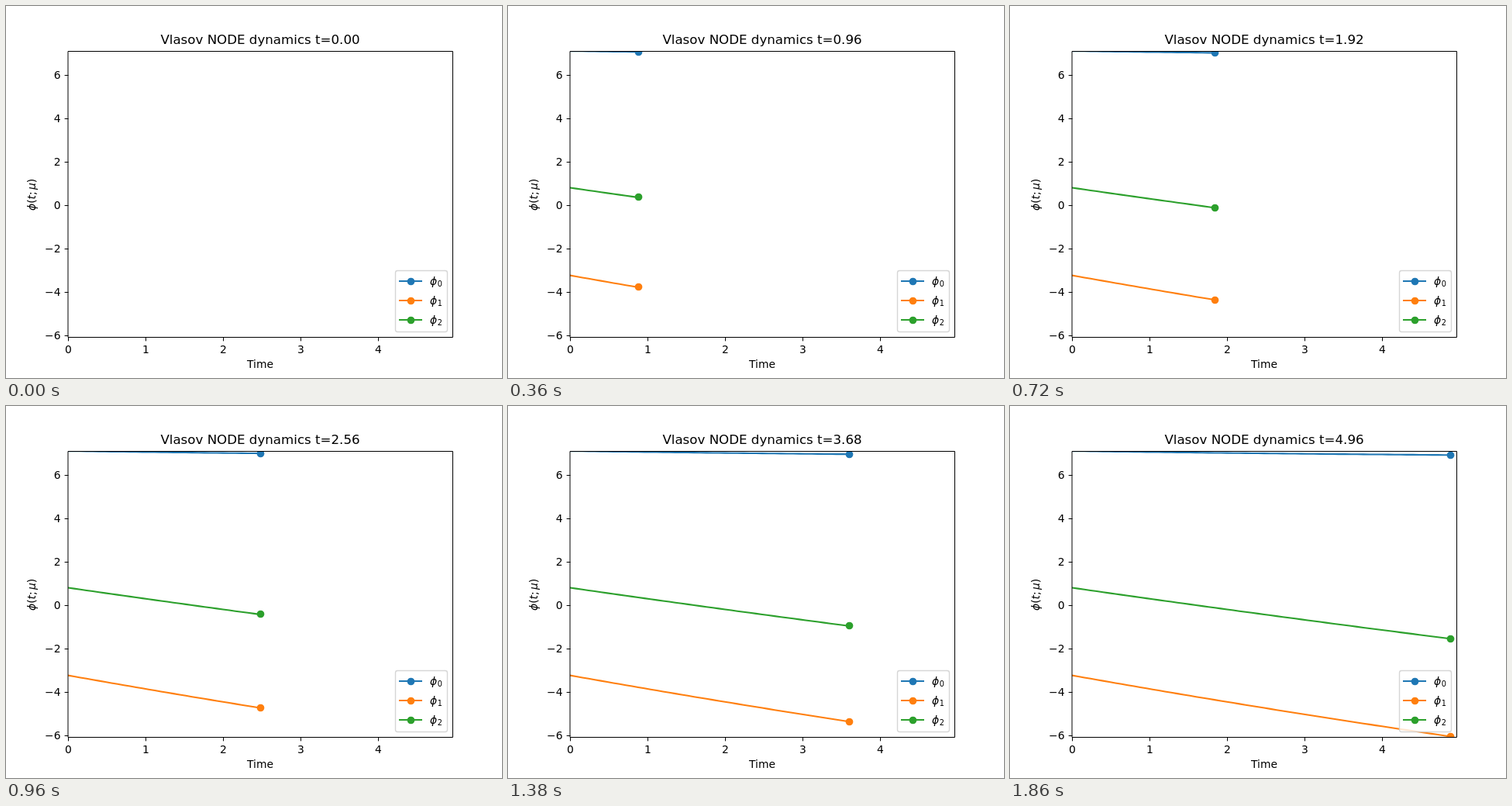
Write an HTML page with a canvas that moves like this. It is 640 px wide and 480 px high and loops after 1.89 s.

```html
<!DOCTYPE html>
<html lang="en">
<head>
<meta charset="utf-8">
<title>Vlasov NODE dynamics</title>
<style>
html, body { margin: 0; width: 100%; height: 100%; overflow: hidden; background: #fff; }
canvas { display: block; }
</style>
</head>
<body>
<canvas id="plot" width="640" height="480"></canvas>
<script>
const ctx = document.getElementById('plot').getContext('2d');
const STEP_MS = 30, STEPS = 63, DT = 0.08;
const LEFT = 80, RIGHT = 576, TOP = 58, BOTTOM = 427;
const FAMILY = '"DejaVu Sans", sans-serif';

// Each curve in pixels: y = a + b t + c t²
const series = [
  { color: '#1f77b4', curve: [58.1, 1.4, -0.07] },
  { color: '#ff7f0e', curve: [347.6, 17.75, -0.33] },
  { color: '#2ca02c', curve: [234.5, 14.35, -0.18] }
];
const xAt = t => LEFT + 100 * t;
const yAt = ([a, b, c], t) => a + b * t + c * t * t;

function text(str, x, y, size = 13.89, align = 'center', style = '') {
  ctx.font = `${style} ${size}px ${FAMILY}`;
  ctx.textAlign = align;
  ctx.fillStyle = '#000';
  ctx.fillText(str, x, y);
}

function stroke(points, color, width, cap = 'butt') {
  ctx.beginPath();
  for (const [x, y] of points) ctx.lineTo(x, y);
  ctx.strokeStyle = color;
  ctx.lineWidth = width;
  ctx.lineCap = cap;
  ctx.lineJoin = 'round';
  ctx.stroke();
}

function marker(x, y, color) {
  ctx.beginPath();
  ctx.arc(Math.floor(x + 0.01) + 0.5, Math.floor(y) + 0.5, 4.86, 0, 2 * Math.PI);
  ctx.fillStyle = color;
  ctx.fill();
}

function drawCurves(count) {
  ctx.save();
  ctx.beginPath();
  ctx.rect(LEFT, TOP, RIGHT - LEFT, BOTTOM - TOP);
  ctx.clip();
  for (const { color, curve } of series) {
    const points = Array.from({ length: count }, (_, i) => [xAt(i * DT), yAt(curve, i * DT)]);
    if (count > 1) stroke(points, color, 2.08, 'square');
    if (count) marker(...points[count - 1], color);
  }
  ctx.restore();
}

function drawAxes() {
  ctx.strokeStyle = '#000';
  ctx.lineWidth = 1;
  ctx.strokeRect(LEFT + 0.5, TOP + 0.5, RIGHT - LEFT, BOTTOM - TOP);
  for (let v = 0; v <= 4; v++) {
    const x = xAt(v) + 0.5;
    stroke([[x, BOTTOM + 0.5], [x, BOTTOM + 5.36]], '#000', 1);
    text(v, x, 448);
  }
  for (let v = -6; v <= 6; v += 2) {
    const y = 257.5 - 28 * v;
    stroke([[LEFT - 4.36, y], [LEFT + 0.5, y]], '#000', 1);
    text(String(v).replace('-', '−'), 70.5, y + 4.5, 13.89, 'right');
  }
  text('Time', 328, 467);
  drawYLabel();
}

function drawYLabel() {
  ctx.save();
  ctx.translate(38, 264);
  ctx.rotate(-Math.PI / 2);
  let x = 0;
  for (const ch of 'ϕ(t;μ)') {
    text(ch, x, 0, 13.89, 'left', /[ϕtμ]/.test(ch) ? 'italic' : '');
    x += ctx.measureText(ch).width + (ch === ';' ? 2.3 : 0);
  }
  ctx.restore();
}

function drawLegend() {
  ctx.beginPath();
  ctx.roundRect(502.5, 341.5, 67, 79, 2.8);
  ctx.fillStyle = 'rgba(255,255,255,.8)';
  ctx.fill();
  ctx.strokeStyle = 'rgba(204,204,204,.8)';
  ctx.lineWidth = 1.39;
  ctx.stroke();
  series.forEach(({ color }, i) => {
    const y = 355 + 25 * i;
    stroke([[508, y], [536, y]], color, 2, 'square');
    marker(522, y, color);
    text('ϕ', 547, y + 5, 13.89, 'left', 'italic');
    text(i, 556.7, y + 7, 9.72, 'left');
  });
}

function draw(step) {
  ctx.fillStyle = '#fff';
  ctx.fillRect(0, 0, 640, 480);
  drawCurves(step);
  drawAxes();
  text(`Vlasov NODE dynamics t=${(step * DT).toFixed(2)}`, 328, 49, 16.67);
  drawLegend();
}

const start = performance.now();
function tick() {
  const elapsed = performance.now() - start;
  draw(Math.floor(elapsed / STEP_MS) % STEPS);
  requestAnimationFrame(tick);
}
tick();
</script>
</body>
</html>
```
